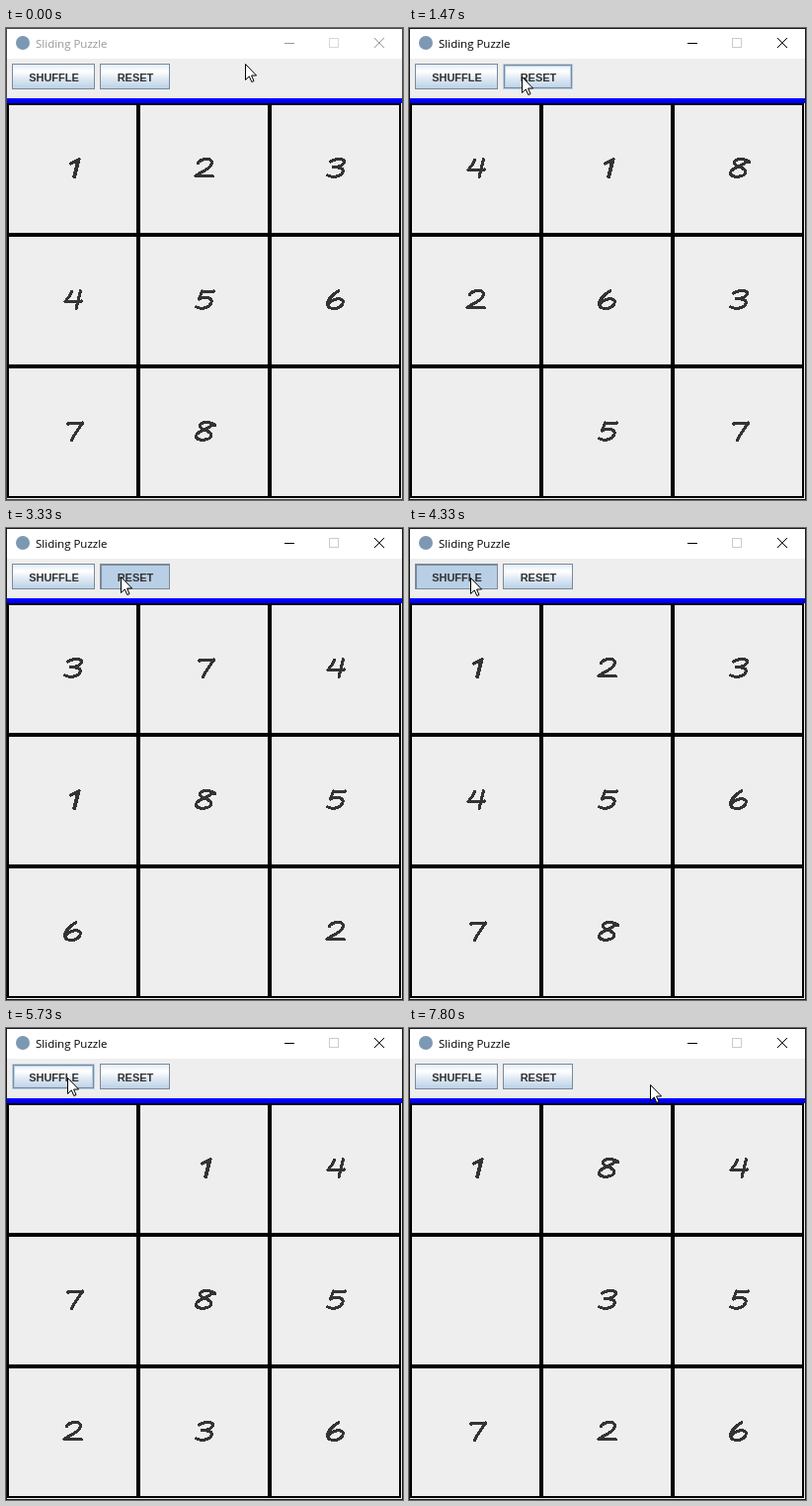
These frames come from a looping animation (402x477 px, 8000 ms). An HTML page:

```html
<!DOCTYPE html>
<html lang="en">
<head>
<meta charset="utf-8">
<title>Sliding Puzzle</title>
<style>
  html, body { margin: 0; width: 100%; height: 100%; overflow: hidden; background: #eee; }
  svg { display: block; width: 402px; height: 477px; }
  .title { font: 11.5px "Open Sans", "Noto Sans", sans-serif; }
  .label { font: bold 11px "Liberation Sans", Arial, sans-serif; fill: #333; text-anchor: middle; }
  .digit { fill: none; stroke: #333; stroke-width: 3.1; stroke-linecap: round; stroke-linejoin: round; }
  .crisp { shape-rendering: crispEdges; }
  .line { fill: none; }
  .button .over, .button .down { display: none; }
  .button.hover .over, .button.pressed .down { display: inline; }
  .window { --frame: #1c1c1c; --ink: #000; --max: #ccc; }
  .window.inactive { --frame: #4a4a4a; --ink: #999; --max: #d8d8d8; }
  .frame { stroke: var(--frame); }
  .title { fill: var(--ink); }
  .icon { stroke: var(--ink); }
  .max { stroke: var(--max); }
</style>
</head>
<body>
<svg class="window inactive" viewBox="0 0 402 477">
  <defs>
    <linearGradient id="steel" x2="0" y2="1">
      <stop offset="0" stop-color="#dde8f3"/>
      <stop offset=".3" stop-color="#fff"/>
      <stop offset=".6" stop-color="#dde8f3"/>
      <stop offset="1" stop-color="#b8cfe5"/>
    </linearGradient>
  </defs>
  <rect width="402" height="477" fill="#eee"/>
  <rect width="402" height="31" fill="#fff"/>
  <rect class="frame line crisp" x=".5" y=".5" width="401" height="476"/>
  <circle cx="17" cy="15" r="7" fill="#7d98b3"/>
  <text class="title" x="30" y="20">Sliding Puzzle</text>
  <path class="icon line crisp" d="M282 15.5h10"/>
  <rect class="max line crisp" x="327.5" y="10.5" width="9" height="9"/>
  <path class="icon line" d="M373 10l10 10M383 10l-10 10"/>
  <g id="buttons"></g>
  <rect class="crisp" x="1" y="71" width="400" height="5" fill="#00f"/>
  <g id="board" class="crisp"></g>
  <path id="cursor" fill="#fff" stroke="#000" stroke-linejoin="miter"
    d="M.5 .5V16.5L4.3 12.9L6.8 18.5L9 17.6L6.6 12H11.6Z"/>
</svg>
<script>
const LOOP = 8000, FPS = 15, TILE = 133;
const byId = id => document.getElementById(id);
const svg = document.querySelector('svg');

function add(parent, tag, attrs) {
  const el = document.createElementNS('http://www.w3.org/2000/svg', tag);
  for (const key in attrs) el.setAttribute(key, attrs[key]);
  return parent.appendChild(el);
}

// Handwritten digits, drawn from the upper left corner of the glyph box
const digitPaths = {
  1: 'M8.5 6Q13 4.500 17 1.500L12.500 19.500M16.200 2L11.700 19.500',
  2: 'M4.500 5.500C7 1 18.500 -.5 18.500 5C18.500 11 8 14 2 18.500C8 17.300 14 19 19.500 18.800',
  3: 'M5.500 4C9 1.200 20 .5 19.500 4C19 8 13 9.500 8.500 9.700C14 9.500 19.500 11 18.300 14.500C16 19.500 7 20.500 2.500 17.800',
  4: 'M9.500 2.500Q7 8 3 12.500Q11 12.800 20 12M18.500 1.800Q16.500 10 14 19.500',
  5: 'M20.500 2Q14 2.500 8.500 2L5.500 10C10 7.500 19.500 7.500 18 13C16 19.500 7 20.500 2.500 17.800',
  6: 'M14 1.500C8 5 2.500 10.500 2.500 15C2.500 20 11 20.500 15 18C19 15 20 10.500 15 9.800C11 9.300 6 11.500 3.500 14.500',
  7: 'M5.500 3Q13 3 21 2C17 7 12.500 13 9.500 19.500',
  8: 'M21.800 4.500C17 .5 8 .5 6.300 4.500C5 9.500 19 9.500 17.800 15C16.500 20 3 21 2.500 15.500C2.500 10.500 14 9 18.500 4.500'
};

// Boards in reading order; "_" is the gap
const SOLVED = '12345678_';
const boards = [
  [0, SOLVED], [930, '41826357_'.replace('57_', '_57')], [1730, SOLVED],
  [2600, '3741856_2'], [3470, SOLVED], [4470, '8361_2754'],
  [4930, '52347_618'], [5330, '741_68532'], [5730, '_14785236'],
  [6600, '1_4785236'], [7000, '1847_5236'], [7330, '1847352_6'],
  [7530, '184735_26'], [7800, '184_35726']
];

// Mouse position: time, x, y
const mouse = [
  [0, 242, 36], [800, 67, 57], [1000, 67, 57], [1530, 116, 49], [1800, 116, 49],
  [2070, 75, 54], [2200, 72, 54], [2800, 72, 54], [3050, 92, 55], [3330, 116, 49],
  [3530, 116, 49], [4000, 62, 50], [5870, 62, 50], [6070, 180, 62], [6200, 244, 57]
];

function makeButton(text, x, w, presses) {
  const y = 36, h = 26;
  const el = add(byId('buttons'), 'g', { class: 'button' });
  const outline = (parent, inset, color) => add(parent, 'rect', {
    class: 'line crisp', x: x + inset + .5, y: y + inset + .5,
    width: w - 1 - 2 * inset, height: h - 1 - 2 * inset, stroke: color
  });
  add(el, 'rect', { x, y, width: w, height: h, fill: 'url(#steel)' });
  outline(el, 0, '#7a8a99');
  const over = add(el, 'g', { class: 'over' });
  ['#b8cfe5', '#7a8a99', '#b8cfe5'].forEach((color, i) => outline(over, i, color));
  const down = add(el, 'g', { class: 'down' });
  add(down, 'rect', { x, y, width: w, height: h, fill: '#b8cfe5' });
  outline(down, 0, '#7a8a99');
  add(down, 'path', {
    class: 'line crisp', stroke: '#7a8a99', d: `M${x + 1.5} ${y + h - 1}V${y + 1.5}H${x + w - 1}`
  });
  add(el, 'text', { class: 'label', x: x + w / 2 + .5, y: y + 18 }).textContent = text;

  return (t, mx, my) => {
    const pressed = presses.some(([from, to]) => t >= from && t < to);
    const inside = mx >= x && mx < x + w && my >= y && my < y + h;
    el.classList.toggle('pressed', pressed);
    el.classList.toggle('hover', inside && !pressed);
  };
}

const buttons = [
  makeButton('SHUFFLE', 6, 84,
    [[800, 930], [2400, 2600], [4330, 4470], [4870, 4930], [5200, 5330], [5600, 5730]]),
  makeButton('RESET', 95, 71, [[1600, 1730], [3330, 3470]])
];

const cells = Array.from(SOLVED, (_, i) => {
  const x = 1 + i % 3 * TILE, y = 76 + Math.floor(i / 3) * TILE;
  add(byId('board'), 'rect', {
    class: 'line', x: x + 1, y: y + 1, width: TILE - 2, height: TILE - 2,
    stroke: '#000', 'stroke-width': 2
  });
  return add(byId('board'), 'path', { class: 'digit', transform: `translate(${x + 56} ${y + 55})` });
});

function mouseAt(t) {
  const next = mouse.findIndex(key => key[0] > t);
  if (next < 0) return mouse[mouse.length - 1].slice(1);
  const [t0, x0, y0] = mouse[next - 1], [t1, x1, y1] = mouse[next];
  const p = (t - t0) / (t1 - t0), ease = p * p * (3 - 2 * p);
  return [Math.round(x0 + (x1 - x0) * ease), Math.round(y0 + (y1 - y0) * ease)];
}

let shown = '';
function render(t) {
  // The pointer moves in 15 steps a second, with times rounded to 10 ms
  const step = Math.round(Math.floor((t + 5) * FPS / 1000) * 100 / FPS) * 10;
  const [mx, my] = mouseAt(step);
  byId('cursor').setAttribute('transform', `translate(${mx} ${my})`);
  svg.classList.toggle('inactive', t < 800);
  buttons.forEach(update => update(t, mx, my));

  const board = boards.filter(([start]) => start <= t).pop()[1];
  if (board !== shown) {
    cells.forEach((cell, i) => cell.setAttribute('d', digitPaths[board[i]] || ''));
    shown = board;
  }
}

const start = performance.now();
function tick() {
  render((performance.now() - start) % LOOP);
  requestAnimationFrame(tick);
}
tick();
</script>
</body>
</html>
```
